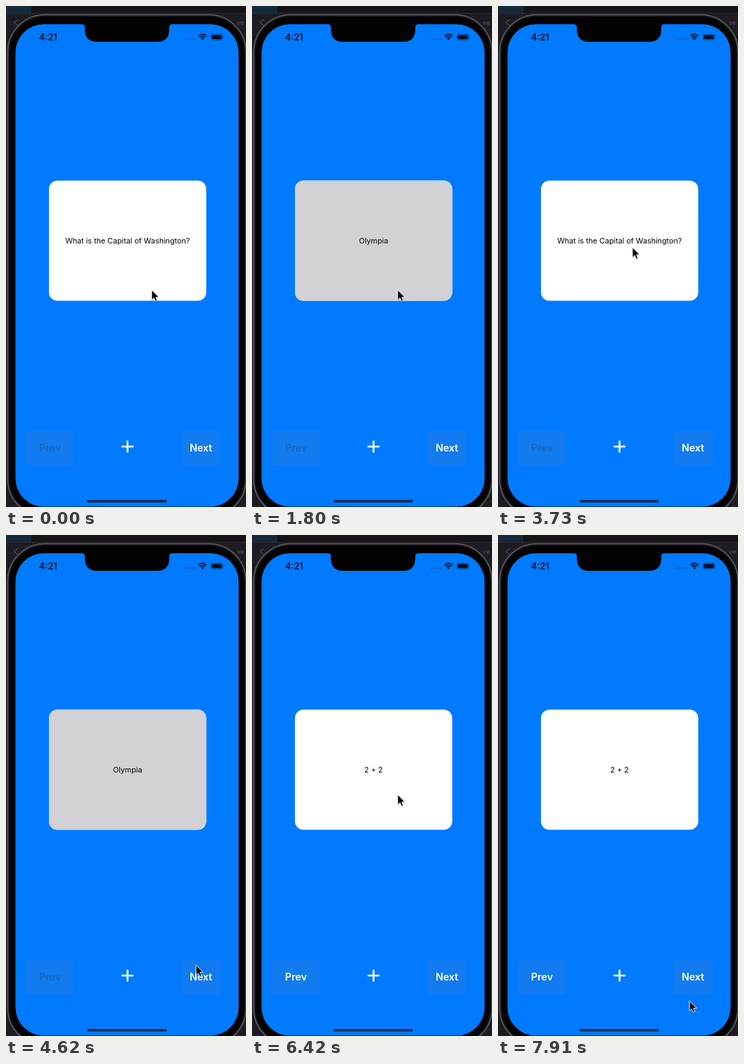
An HTML page that plays this animation: 341x713 px, repeating every 8000 ms.

```html
<!DOCTYPE html>
<html lang="en">
<head>
<meta charset="utf-8">
<title>Flash cards</title>
<style>
html, body { margin: 0; width: 100%; height: 100%; overflow: hidden; background: #1f1b22; }
svg { display: block; width: 341px; height: 713px; font-family: Inter, Roboto, sans-serif; }
.copy { font-size: 10.75px; text-anchor: middle; fill: #050505; }
.label { font-size: 14.2px; font-weight: 600; text-anchor: middle; fill: #fff; }

.back, .one, .two, .off, .on, .press, .cursor { animation: 8s step-end infinite; }
.back { animation-name: flip; }
.one, .off { animation-name: first; }
.two, .on { animation-name: second; }
.press { animation-name: press; }
.cursor { animation-name: move; }

@keyframes flip {
  0%, 13.125%, 30%, 63.375%, 80.25%, 93.25%, 100% { opacity: 0; }
  7.5%, 22.5%, 48.5%, 74.625%, 87.75% { opacity: 1; }
}
@keyframes first { 0% { opacity: 1; } 63.375%, 100% { opacity: 0; } }
@keyframes second { 0% { opacity: 0; } 63.375%, 100% { opacity: 1; } }
@keyframes press { 0%, 63.375%, 100% { opacity: 1; } 61.5% { opacity: .3; } }
/* the pointer is redrawn about every 150 ms */
@keyframes move {
  0% { transform: translate(207px, 404px); }
  33.75% { transform: translate(218px, 450px); }
  35.625% { transform: translate(246px, 555px); }
  37.5% { transform: translate(264px, 615px); }
  39.375% { transform: translate(268px, 627px); }
  41.25% { transform: translate(262px, 600px); }
  42.875% { transform: translate(232px, 490px); }
  44.75% { transform: translate(200px, 375px); }
  46.625% { transform: translate(191px, 343.5px); }
  50.375% { transform: translate(192px, 348px); }
  52.125% { transform: translate(200px, 380px); }
  54% { transform: translate(222px, 460px); }
  55.875% { transform: translate(250px, 555px); }
  57.75% { transform: translate(270px, 612px); }
  59.625% { transform: translate(277px, 628px); }
  67.125% { transform: translate(238px, 480px); }
  69% { transform: translate(207px, 369.5px); }
  95.125% { transform: translate(226px, 455px); }
  97% { transform: translate(258px, 600px); }
  98.875%, 100% { transform: translate(272px, 663px); }
}
</style>
</head>
<body>
<svg viewBox="0 0 341 713">
  <!-- desktop behind the phone -->
  <rect width="341" height="713" fill="#1f1b22"/>
  <rect width="341" height="10" fill="#17131b"/>
  <rect width="36" height="10" fill="#14283a"/>
  <path d="M0 10.5H341" stroke="#2e2931"/>
  <path d="M17 19L11 23.5L17 28" fill="none" stroke="#655f68"/>
  <text x="328" y="27" font-size="9" fill="#5b555e">ve</text>

  <!-- phone -->
  <rect x="2.5" y="12.5" width="338.5" height="714" rx="53" fill="#030303" stroke="#555458" stroke-width="2"/>
  <rect x="4.7" y="14.7" width="334" height="710" rx="51" fill="none" stroke="#1a1a1c"/>
  <rect x="13.5" y="26" width="317" height="686.5" rx="40" fill="#007aff"/>
  <path d="M108 25V26Q112 26 112 30V33Q112 51 130 51H214Q232 51 232 33V30Q232 26 236 26V25Z" fill="#030303"/>

  <!-- status bar -->
  <g fill="#00101f">
    <text x="47" y="48.5" font-size="12.6" font-weight="600">4:21</text>
    <g fill="#0759b5">
      <circle cx="255.5" cy="47" r="1.2"/><circle cx="259.5" cy="47" r="1.2"/>
      <circle cx="263.5" cy="47" r="1.2"/><circle cx="267.5" cy="47" r="1.2"/>
    </g>
    <g fill="none" stroke="#00101f" stroke-width="1.9">
      <path d="M273.6 42.7Q279.2 37.8 284.8 42.7"/>
      <path d="M275.8 45.1Q279.2 42.2 282.6 45.1"/>
    </g>
    <path d="M277.2 46.6Q279.2 45.2 281.2 46.6L279.2 48.7Z"/>
    <rect x="291" y="40" width="17" height="8.4" rx="2.4" fill="none" stroke="#064b96" stroke-width=".9"/>
    <rect x="292.2" y="41.2" width="14.6" height="6" rx="1.4"/>
    <path d="M309 42.8Q310.4 44.2 309 45.6Z" fill="#064b96"/>
  </g>

  <!-- card -->
  <g class="copy">
    <rect x="61" y="248.5" width="223.5" height="171" rx="12" fill="#fefefe"/>
    <text class="one" x="172.7" y="338">What is the Capital of Washington?</text>
    <text class="two" x="172.7" y="338">2 + 2</text>
    <g class="back">
      <rect x="61" y="248.5" width="223.5" height="171" rx="12" fill="#d1d1d6"/>
      <text class="one" x="172.7" y="338">Olympia</text>
      <text class="two" x="172.7" y="338">4</text>
    </g>
  </g>

  <!-- controls -->
  <g class="label">
    <rect x="28" y="604.5" width="68.5" height="49" rx="4" fill="#127bf0"/>
    <rect x="249" y="604.5" width="56" height="49" rx="4" fill="#127bf0"/>
    <text class="off" x="62.5" y="634" fill="#1a66bd" style="fill:#1a66bd">Prev</text>
    <text class="on" x="62.5" y="634">Prev</text>
    <text class="press" x="277" y="634">Next</text>
  </g>
  <path d="M165.2 627H180.2M172.7 619.5V634.5" stroke="#fff" stroke-width="2.6" stroke-linecap="round"/>
  <rect x="115.5" y="703" width="113" height="3.6" rx="1.8" fill="#12294a"/>

  <!-- pointer -->
  <g class="cursor">
    <path d="M.3 1.5V16L3.6 13 5.8 18 8.4 17 6.3 12H10.8Z" fill="#000" opacity=".22"/>
    <path d="M0 0V14.4L3.2 11.4 5.4 16.4 7.9 15.3 5.8 10.5H10.2Z" fill="#000" stroke="#fff" stroke-width=".9"/>
  </g>
</svg>
</body>
</html>
```
